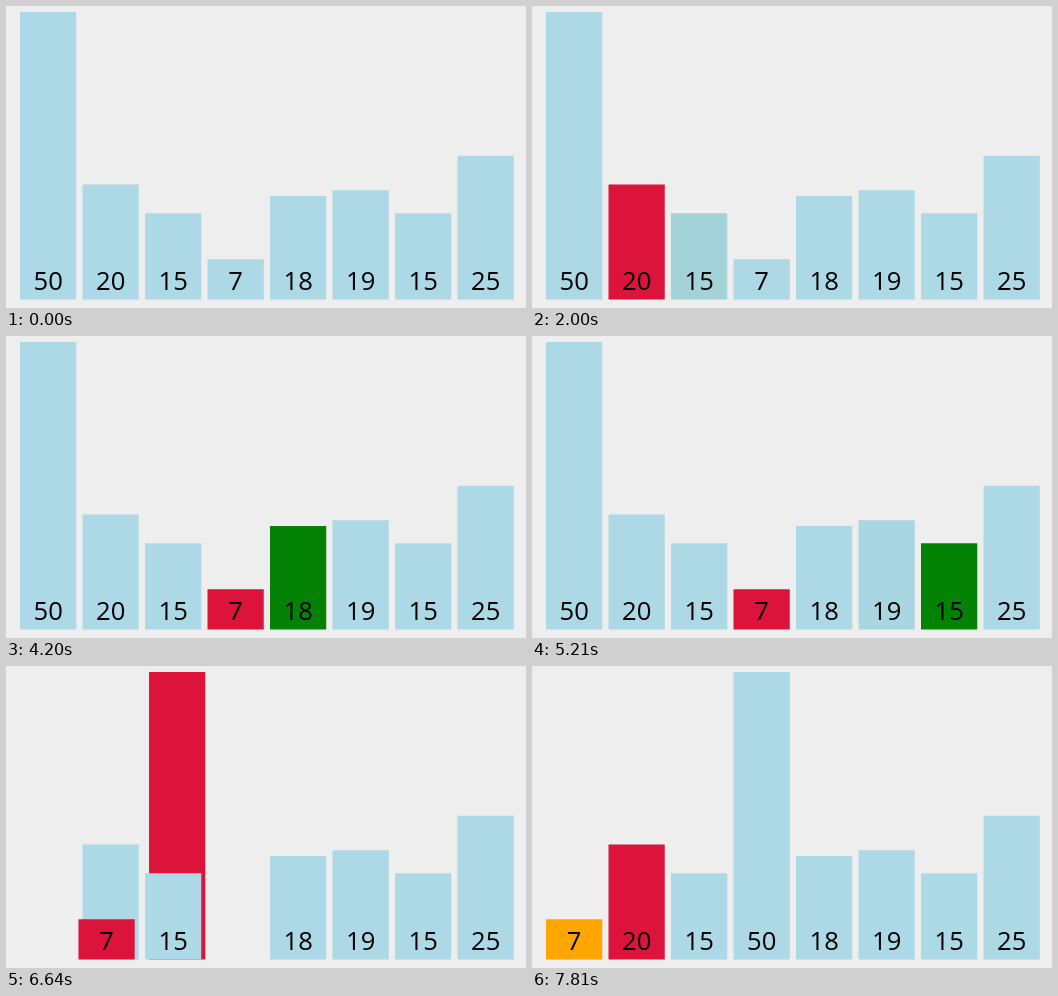
Recreate the animation shown at these times as an HTML page with a canvas. Size 520 by 302 pixels, loop 8 s.

```html
<!DOCTYPE html>
<html lang="en">
<head>
<meta charset="utf-8">
<title>Selection sort</title>
<style>
html, body { margin: 0; width: 100%; height: 100%; overflow: hidden; background: #eee; }
canvas { display: block; }
</style>
</head>
<body>
<canvas id="stage" width="520" height="302"></canvas>
<script>
const ctx = document.getElementById('stage').getContext('2d');
const LOOP = 8000, FADE = 250;
const STEP = 62.5, WIDTH = 56.25, BASE = 293.5, UNIT = 5.75;
const BLUE = [173, 216, 230], RED = [220, 20, 60], GREEN = [0, 128, 0], ORANGE = [255, 165, 0];
const values = [50, 20, 15, 7, 18, 19, 15, 25];

// Each event: start time, then [bar, colour] pairs that fade in
const events = [
  [485, [0, RED]],
  [1000, [1, GREEN]],
  [1525, [0, BLUE], [1, RED]],
  [1983, [2, GREEN]],
  [2500, [1, BLUE], [2, RED]],
  [3010, [3, GREEN]],
  [3520, [2, BLUE], [3, RED]],
  [4000, [4, GREEN]],
  [4485, [4, BLUE], [5, GREEN]],
  [5005, [5, BLUE], [6, GREEN]],
  [5505, [6, BLUE], [7, GREEN]],
  [6030, [7, BLUE], [0, RED]],
  [7060, [3, ORANGE], [0, BLUE]],
  [7565, [1, RED]]
];
const swap = { start: 6540, a: 0, b: 3 };

// The CSS "ease" curve: cubic-bezier(.25, .1, .25, 1)
function ease(p) {
  if (p <= 0) return 0;
  if (p >= 1) return 1;
  const curve = (u, a, b) => 3 * a * u * (1 - u) ** 2 + 3 * b * u * u * (1 - u) + u ** 3;
  let lo = 0, hi = 1;
  for (let i = 0; i < 24; i++) {
    const mid = (lo + hi) / 2;
    if (curve(mid, 0.25, 0.25) < p) lo = mid; else hi = mid;
  }
  return curve(lo, 0.1, 1);
}

const progress = (t, start) => ease((t - start) / FADE);
const mix = (from, to, k) => from.map((c, i) => c + (to[i] - c) * k);

function draw(t) {
  const colors = values.map(() => BLUE);
  for (const [start, ...changes] of events) {
    const k = progress(t, start);
    for (const [bar, color] of changes) colors[bar] = mix(colors[bar], color, k);
  }

  const slots = values.map((_, i) => i);
  const shift = (swap.b - swap.a) * progress(t, swap.start);
  slots[swap.a] += shift;
  slots[swap.b] -= shift;

  ctx.fillStyle = '#eee';
  ctx.fillRect(0, 0, 520, 302);
  ctx.font = '25.6px "Open Sans", "Noto Sans", sans-serif';
  ctx.textAlign = 'center';
  values.forEach((value, i) => {
    const x = 14 + STEP * slots[i], height = value * UNIT;
    ctx.fillStyle = `rgb(${colors[i].map(Math.round)})`;
    ctx.fillRect(x, BASE - height, WIDTH, height);
    ctx.fillStyle = '#000';
    ctx.fillText(value, x + WIDTH / 2, 284);
  });
}

const begin = performance.now();
function frame() {
  draw((performance.now() - begin) % LOOP);
  requestAnimationFrame(frame);
}
frame();
</script>
</body>
</html>
```
